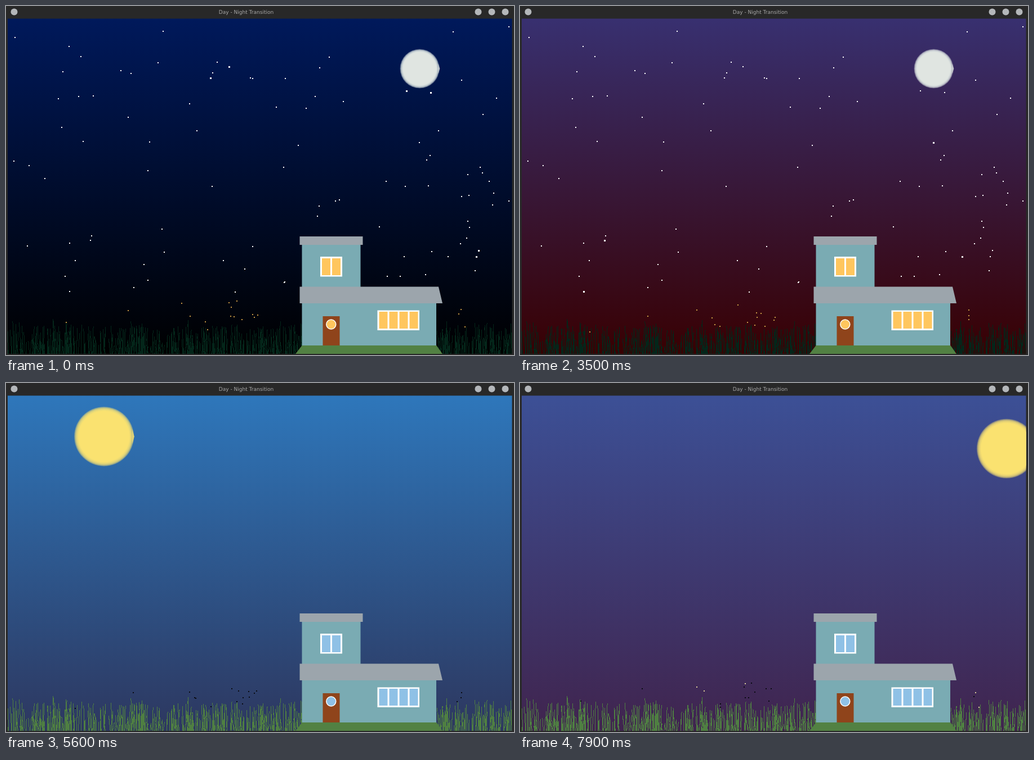
Animation of 902x621 px, one loop 8000 ms. Source, as an HTML page:

```html
<!DOCTYPE html>
<html lang="en">
<head>
<meta charset="utf-8">
<title>Day - Night Transition</title>
<style>
  html, body { margin: 0; width: 100%; height: 100%; overflow: hidden; background: #282828; }
  svg { display: block; }
</style>
</head>
<body>
<svg id="stage" width="902" height="621" viewBox="0 0 902 621">
  <defs>
    <linearGradient id="skyFill" x1="0" y1="0" x2="0" y2="1">
      <stop offset="0"/><stop offset="1"/>
    </linearGradient>
    <clipPath id="view"><rect x="3" y="22.5" width="895.5" height="596.5"/></clipPath>
  </defs>
  <rect width="902" height="621" fill="#282828"/>
  <g fill="#b4b7ba">
    <circle cx="14.5" cy="10.5" r="6"/><circle cx="838.5" cy="10.5" r="6"/>
    <circle cx="862.5" cy="10.5" r="6"/><circle cx="886.5" cy="10.5" r="6"/>
  </g>
  <text x="426.5" y="14" text-anchor="middle" font-size="9" fill="#a9a9a9" font-family="'DejaVu Sans', sans-serif">Day - Night Transition</text>
  <g clip-path="url(#view)">
    <rect x="3" y="22" width="896" height="597" fill="url(#skyFill)"/>
    <g id="moon" fill="#e0e5e1"/>
    <g id="stars" fill="#fff" shape-rendering="crispEdges"/>
    <g id="sun" fill="#fae270"/>
    <path id="grass" fill="none" shape-rendering="crispEdges"/>
    <g id="flies" shape-rendering="crispEdges"/>
    <path d="M514 619L526 603.5H764L775 619Z" fill="#528143"/>
    <path d="M525.5 425H629.5V500H764V604H525.5Z" fill="#7aabb3"/>
    <path d="M521.5 410H633.5V425H521.5ZM521.5 499.5H768L775 529H521.5Z" fill="#9ca5ac"/>
    <rect x="562.5" y="552" width="30" height="52" fill="#8f441b"/>
    <path d="M558 446H597V481.5H558ZM659.5 541.5H734V577H659.5Z" fill="#fff"/>
    <g id="glass">
      <circle cx="577.3" cy="566.5" r="8.5" stroke="#fff" stroke-width="1.5"/>
    </g>
  </g>
</svg>
<script>
const LOOP = 8000, DAWN = 3800;
const $ = id => document.getElementById(id);
const lerp = (a, b, k) => a + (b - a) * k;
const clamp = k => Math.min(1, Math.max(0, k));

function set(node, attrs) {
  for (const key in attrs) node.setAttribute(key, attrs[key]);
  return node;
}

function add(parent, tag, attrs = {}) {
  const node = document.createElementNS('http://www.w3.org/2000/svg', tag);
  return parent.appendChild(set(node, attrs));
}

function seeded(seed) {
  return () => (seed = seed * 48271 % 2147483647) / 2147483647;
}
const rand = seeded(90210733);
const between = (a, b) => lerp(a, b, rand());

// Sky colours, top and bottom
const sky = [
  { at: 2650, top: '#00195b', bottom: '#000000' },
  { at: 3500, top: '#383070', bottom: '#380002' },
  { at: 4200, top: '#314783', bottom: '#312246' },
  { at: 5600, top: '#2e77bb', bottom: '#2d375f' },
  { at: 7300, top: '#2875c2', bottom: '#283964' },
  { at: 7900, top: '#3c5096', bottom: '#40244e' }
];
const stops = document.querySelectorAll('#skyFill stop');

function mix(from, to, k) {
  const part = (hex, i) => parseInt(hex.substr(i, 2), 16);
  return `rgb(${[1, 3, 5].map(i => Math.round(lerp(part(from, i), part(to, i), k)))})`;
}

function drawSky(t) {
  const next = Math.max(1, sky.findIndex(key => key.at >= t));
  const a = sky[next - 1], b = sky[next];
  const k = clamp((t - a.at) / (b.at - a.at));
  set(stops[0], { 'stop-color': mix(a.top, b.top, k) });
  set(stops[1], { 'stop-color': mix(a.bottom, b.bottom, k) });
}

// Soft disc: translucent rings with a small tip on the right
function disc(group, inner, outer) {
  const rings = Array.from({ length: 12 }, (_, i) =>
    add(group, 'circle', { r: lerp(outer, inner, i / 11) }));
  const core = add(group, 'circle', { r: inner });
  const d = outer * .26;
  const tip = add(group, 'path', { d: `M${outer * .95} ${-d}L${outer + .8} 0L${outer * .95} ${d}Z` });
  return (x, y, strength) => {
    set(group, { transform: `translate(${x} ${y})` });
    rings.forEach(ring => set(ring, { 'fill-opacity': .25 * strength }));
    set(core, { 'fill-opacity': 1 - (1 - .25 * strength) ** 24 });
    set(tip, { 'fill-opacity': .8 * Math.sqrt(strength) });
  };
}
const drawMoon = disc($('moon'), 30, 35);
const drawSun = disc($('sun'), 45.5, 53);

const stars = Array.from({ length: 97 }, () => ({
  x: Math.round(between(6, 895)),
  y: Math.round(between(26, 530)),
  phase: rand(),
  node: add($('stars'), 'rect')
}));

// Stars are 2px wide and now and then flare or dim
function drawStar(star, t) {
  const slot = Math.floor(t / 400 + star.phase);
  const n = Math.sin(star.phase * 1290 + slot * 78.233) * 43758.5453;
  const r = n - Math.floor(n);
  const size = r < .025 ? 3 : r > .97 ? 1 : 2;
  set(star.node, { x: star.x, y: star.y, width: size, height: size });
}

let blades = '';
for (let i = 0; i < 720; i++) {
  const height = between(8, 50) + rand() ** 5 * 14;
  blades += `M${between(3, 898).toFixed(1)} 619l${between(-3, 3).toFixed(1)} ${-height.toFixed(1)}`;
}
set($('grass'), { d: blades });

// Every sixth fly lives right of the house
const flies = Array.from({ length: 18 }, (_, i) => ({
  x: i % 6 ? between(85, 460) : between(780, 820),
  y: between(533, 572),
  reach: between(5, 13),
  phase: between(0, 2 * Math.PI),
  wake: i % 4 ? LOOP : between(5400, 7800),
  node: add($('flies'), 'rect', { width: 2, height: 2 })
}));

function drawFly(fly, t) {
  const turn = t / 1300 + fly.phase;
  set(fly.node, {
    x: Math.round(fly.x + fly.reach * Math.sin(turn)),
    y: Math.round(fly.y + fly.reach * Math.cos(turn * .8)),
    fill: t < DAWN ? '#c99a45' : t >= fly.wake ? '#dccf9a' : '#080a10'
  });
}

function addPanes(x, y, count) {
  for (let i = 0; i < count; i++) {
    add($('glass'), 'rect', { x: x + i * 18, y, width: 15, height: 30 });
  }
}
addPanes(561, 449, 2);
addPanes(662.5, 544, 4);

// Stretches where the picture stands still
const holds = [[2400, 2700], [5600, 5900], [6000, 6200], [6300, 6600],
  [6800, 7000], [7100, 7300], [7300, 7500], [7700, 7900]];

function stepTime(ms) {
  const t = Math.floor(ms % LOOP / 100) * 100;
  const hold = holds.find(([from, to]) => t >= from && t < to);
  return hold ? hold[0] : t;
}

function draw(t) {
  const day = t >= DAWN;
  drawSky(t);
  drawMoon(734.5, 111.5, clamp((4700 - t) / 800));

  const s = t / 1000 - 5.6;
  const sunX = 174 + 203.3 * s + 40.5 * s ** 2 + .66 * s ** 3;
  $('sun').style.display = day ? '' : 'none';
  drawSun(sunX, 79 + .000217 * (sunX - 446.6) ** 2, 1);

  $('stars').style.display = day ? 'none' : '';
  stars.forEach(star => drawStar(star, t));
  flies.forEach(fly => drawFly(fly, t));
  set($('grass'), { stroke: day ? '#4f7f42' : '#04261a' });
  set($('glass'), { fill: day ? '#8fc1e6' : '#ffc65e' });
}

const start = performance.now();
function tick() {
  draw(stepTime(performance.now() - start));
  requestAnimationFrame(tick);
}
tick();
</script>
</body>
</html>
```
